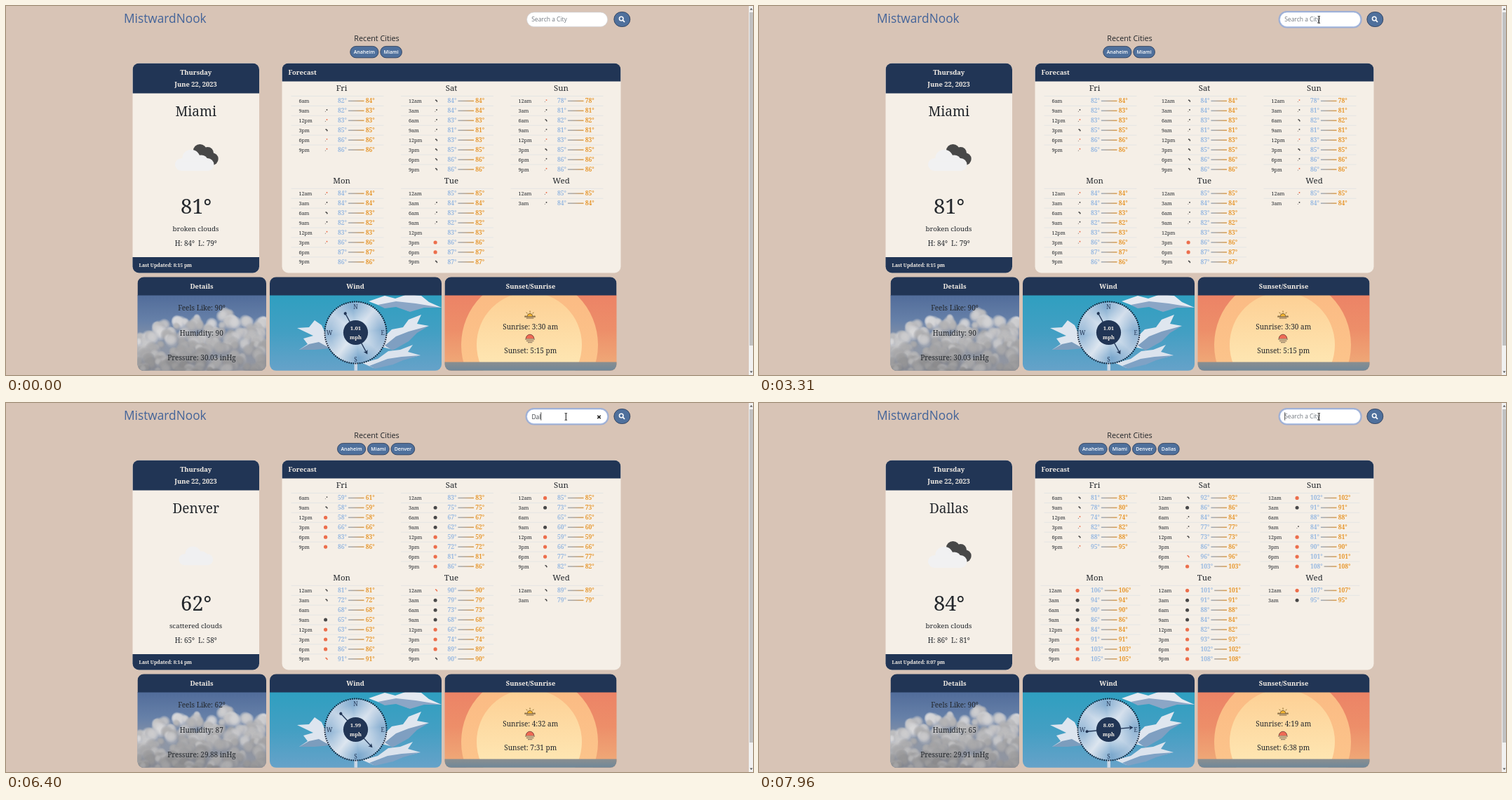
Animation, 1065 px wide and 526 px high, one loop 8000 ms. Source, as an HTML page with a canvas:

```html
<!DOCTYPE html>
<html lang="en">
<head>
<meta charset="utf-8">
<title>Weather dashboard</title>
<style>
  html, body { margin: 0; width: 100%; height: 100%; overflow: hidden; background: #d8c4b6; }
  canvas { display: block; }
</style>
</head>
<body>
<canvas id="stage" width="1065" height="526"></canvas>
<script>
const LOOP = 8000;
const NAVY = '#213555', BLUE = '#4f709c', SAND = '#d8c4b6', CREAM = '#f5efe7', INK = '#23272c';
const HOURS = ['12am', '3am', '6am', '9am', '12pm', '3pm', '6pm', '9pm'];
const DAYS = ['Fri', 'Sat', 'Sun', 'Mon', 'Tue', 'Wed'];

// Each day: temperatures (low-high when they differ), then one icon letter per row.
const CITIES = [
  { name: 'Miami', sky: 'broken clouds', now: 81, high: 84, low: 79, updated: '8:15', feels: 90, humidity: 90,
    pressure: '30.03', wind: '1.01', rise: '3:30', set: '5:15', days: [
    '82-84 82-83 83 85 86 86|-rodoo', '84 84 83 81 83 85 86 86|drrrdddd', '78 81 82 81 83 85 86 86|ordrodro',
    '84 84 83 82 83 86 87 86|ordroo--', '85 84 83 82 83 86 87 87|-rrr-ssd', '85 84|or'] },
  { name: 'Denver', sky: 'scattered clouds', now: 62, high: 65, low: 58, updated: '8:14', feels: 62, humidity: 87,
    pressure: '29.88', wind: '1.99', rise: '4:32', set: '7:31', days: [
    '59-61 58-59 58 66 83 86|rdssss', '83 75 67 62 59 72 81 86|-mmmssss', '85 73 65 60 59 66 77 82|sm-msssd',
    '81 72 68 65 63 72 86 91|dd-msssq', '90 79 73 68 66 74 89 90|qmmmsssd', '89 79|dd'] },
  { name: 'Dallas', sky: 'broken clouds', now: 84, high: 86, low: 81, updated: '8:07', feels: 90, humidity: 65,
    pressure: '29.91', wind: '8.05', rise: '4:19', set: '6:38', days: [
    '81-83 78-80 74 82 88 95|ddoodo', '92 86 84 77 73 86 96 103|dmrrd-qs', '102 91 88 84 81 90 101 108|sm-rssss',
    '106 94 90 86 84 91 103 105|smmmssss', '101 91 88 84 82 93 102 108|smmmssss', '107 95|sm'] }
];

const stage = document.getElementById('stage').getContext('2d');
let ctx = stage;

const serif = (size, weight = 400) => `${weight} ${size}px "Noto Serif", serif`;
const sans = (size, weight = 400) => `${weight} ${size}px "Open Sans", "Noto Sans", sans-serif`;

function text(str, x, y, font, color = INK, align = 'center') {
  ctx.font = font;
  ctx.fillStyle = color;
  ctx.textAlign = align;
  ctx.fillText(str, x, y);
  return ctx.measureText(str).width;
}
function box(x, y, w, h, r, fill, stroke, width = 1) {
  ctx.beginPath();
  ctx.roundRect(x, y, w, h, r);
  if (fill) { ctx.fillStyle = fill; ctx.fill(); }
  if (stroke) { ctx.strokeStyle = stroke; ctx.lineWidth = width; ctx.stroke(); }
}
function disc(x, y, r, fill) {
  ctx.beginPath();
  ctx.arc(x, y, r, 0, 7);
  ctx.fillStyle = fill;
  ctx.fill();
}
function path(points, stroke, width = 1) {
  ctx.beginPath();
  for (let i = 0; i < points.length; i += 2) ctx.lineTo(points[i], points[i + 1]);
  if (stroke) { ctx.strokeStyle = stroke; ctx.lineWidth = width; ctx.stroke(); }
}
function polygon(points, fill) {
  path(points);
  ctx.fillStyle = fill;
  ctx.fill();
}
function addStops(g, colors) {
  colors.forEach((c, i) => g.addColorStop(i / (colors.length - 1), c));
  return g;
}
const gradient = (x0, y0, x1, y1, ...colors) => addStops(ctx.createLinearGradient(x0, y0, x1, y1), colors);

function glow(x, y, r, ...colors) {
  disc(x, y, r, addStops(ctx.createRadialGradient(x, y, 0, x, y, r), colors));
}
function seeded(seed) {
  return () => (seed = (seed * 16807) % 2147483647) / 2147483647;
}

// CSS "ease": cubic-bezier(.25, .1, .25, 1)
function ease(x) {
  if (x <= 0) return 0;
  if (x >= 1) return 1;
  const curve = (a, b, s) => 3 * a * s * (1 - s) ** 2 + 3 * b * s * s * (1 - s) + s ** 3;
  let lo = 0, hi = 1;
  for (let i = 0; i < 20; i++) {
    const mid = (lo + hi) / 2;
    if (curve(.25, .25, mid) < x) lo = mid; else hi = mid;
  }
  return curve(.1, 1, lo);
}

function panel(x, y, w, h, head, paint) {
  ctx.save();
  box(x, y, w, h, 9);
  ctx.clip();
  paint();
  ctx.fillStyle = NAVY;
  ctx.fillRect(x, y, w, head);
  ctx.restore();
}

function cloudySky() {
  ctx.fillStyle = gradient(0, 412, 0, 520, '#516c9a', '#6680a8', '#8d97a8', '#92949c');
  ctx.fillRect(187, 412, 185, 109);
  const rnd = seeded(77), count = 230;
  // Puffs are laid from the ridge of the cloud bank down to its shaded foot.
  for (let i = 0; i < count; i++) {
    const depth = i / count, x = 188 + rnd() * 184;
    const ridge = 452 - 15 * Math.sin((x - 193) / 58) ** 2 - (x > 300 ? 9 : 0) + Math.max(0, 208 - x);
    const y = ridge + depth * (524 - ridge) + rnd() * 5, r = 6 + rnd() * 6;
    const v = Math.round(212 - 58 * depth + (rnd() - .5) * 40);
    const lit = `${v},${v - 1},${v - 1}`, shade = `${v - 28},${v - 25},${v - 16}`;
    glow(x, y + 2.5, r, `rgba(${shade},.75)`, `rgba(${shade},.65)`, `rgba(${shade},0)`);
    glow(x - 1, y, r * .85, `rgba(${lit},.85)`, `rgba(${lit},.7)`, `rgba(${lit},0)`);
  }
}

function windySky() {
  ctx.fillStyle = gradient(0, 412, 0, 520, '#2f9fc0', '#439fc3', '#66a2c9');
  ctx.fillRect(376, 412, 246, 109);
  polygon([517, 421, 540, 413, 555, 417, 572, 411, 592, 413, 603, 422, 621, 430, 596, 429, 574, 435, 556, 427, 538, 429], '#e4e9f1');
  polygon([530, 426, 556, 421, 584, 424, 621, 430, 596, 430, 576, 436, 556, 429, 540, 431], '#8ba6c6');
  polygon([536, 486, 541, 470, 550, 461, 566, 458, 574, 447, 592, 440, 586, 453, 603, 456, 585, 464, 574, 476, 552, 490], '#dfe6ef');
  polygon([540, 484, 556, 471, 574, 464, 603, 456, 586, 466, 574, 478, 551, 491], '#7f9fc1');
  polygon([508, 509, 530, 503, 545, 492, 562, 490, 580, 483, 573, 493, 591, 498, 566, 504, 552, 510, 524, 516], '#dbe3ed');
  polygon([518, 513, 544, 503, 564, 500, 591, 498, 566, 505, 552, 511, 526, 517], '#7fa2c5');
  polygon([415, 459, 432, 458, 440, 448, 450, 455, 457, 470, 462, 488, 436, 487, 418, 490, 430, 482, 424, 474, 438, 470], '#dde5ef');
  polygon([418, 490, 432, 482, 446, 479, 462, 488, 440, 490], '#7c9dbd');
}

function compass() {
  const cx = 498.5, cy = 465.5;
  box(496.5, 509, 4.5, 12, 0, '#c9d7e6');
  const metal = ctx.createConicGradient(-.9, cx, cy);
  disc(cx, cy, 43.5, addStops(metal, ['#d3deeb', '#8cb1d2', '#b4cbe1', '#7ba8cd', '#dbe4ee', '#94b7d6', '#c3d4e6', '#84add0', '#d3deeb']));
  glow(cx, cy, 36, 'rgba(240,245,250,.75)', 'rgba(226,235,244,.55)', 'rgba(220,231,242,0)');
  ctx.setLineDash([1.7, 1.4]);
  ctx.beginPath();
  ctx.arc(cx, cy, 44, 0, 7);
  ctx.strokeStyle = '#101d33';
  ctx.lineWidth = 2;
  ctx.stroke();
  ctx.setLineDash([]);
  [['N', 0, -34], ['S', 0, 41], ['W', -37.5, 3.5], ['E', 38.5, 3.5]]
    .forEach(([s, dx, dy]) => text(s, cx + dx, cy + dy, serif(8.3), NAVY));
}

function sunScene() {
  ctx.fillStyle = gradient(0, 412, 0, 510, '#ec8366', '#ed8e69', '#efa877');
  ctx.fillRect(625, 412, 246, 109);
  disc(746.5, 483, 97.5, gradient(0, 412, 0, 510, '#fbbb84', '#fcc48b'));
  disc(746, 483, 75, gradient(0, 412, 0, 510, '#fdd095', '#fee6b2'));
  ctx.fillStyle = gradient(0, 507, 0, 520, '#8b8f90', '#6f8799');
  ctx.fillRect(625, 507.5, 246, 13);
}

function sunIcons() {
  ctx.lineCap = 'round';
  ctx.beginPath();
  ctx.arc(747, 442.5, 4, Math.PI, 0);
  ctx.fillStyle = '#f4b52f';
  ctx.fill();
  ctx.strokeStyle = '#57452f';
  ctx.lineWidth = .8;
  ctx.stroke();
  for (let i = 0; i < 5; i++) {
    const a = Math.PI * (1 + i / 4), c = Math.cos(a), s = Math.sin(a);
    path([747 + c * 5.4, 442 + s * 5.4, 747 + c * 7.2, 442 + s * 7.2], '#806022', .9);
  }
  path([739.5, 443, 754.5, 443], '#57452f', 1);
  path([742, 445, 752, 445], '#57452f', .8);

  ctx.beginPath();
  ctx.arc(747, 474, 5.8, Math.PI, 0);
  ctx.fillStyle = '#ee6a55';
  ctx.fill();
  ctx.strokeStyle = '#6d3934';
  ctx.lineWidth = .8;
  ctx.stroke();
  path([740.5, 475, 753.5, 475], '#54453e', .9);
  path([742, 477.4, 752, 477.4], '#54453e', .8);
  path([744, 479.7, 750, 479.7], '#54453e', .8);
  ctx.lineCap = 'butt';
}

function scrollbar() {
  ctx.fillStyle = '#f1f1f1';
  ctx.fillRect(1059, 0, 6, 526);
  ctx.fillStyle = '#c1c1c1';
  ctx.fillRect(1060, 9, 5, 475);
  polygon([1060.5, 5.5, 1064.5, 5.5, 1062.5, 3], '#505050');
  polygon([1060.5, 520.5, 1064.5, 520.5, 1062.5, 523], '#505050');
}

function buildBackdrop() {
  const layer = document.createElement('canvas');
  layer.width = 1065;
  layer.height = 526;
  ctx = layer.getContext('2d');
  ctx.fillStyle = SAND;
  ctx.fillRect(0, 0, 1065, 526);
  const head = serif(9.4, 700);
  text('MistwardNook', 168, 24, sans(17.3, 500), '#446499', 'left');
  text('Recent Cities', 528.5, 50, sans(10.8, 500), '#212529');

  panel(180.5, 81.5, 180.5, 299, 43, () => {
    ctx.fillStyle = CREAM;
    ctx.fillRect(180, 81, 182, 300);
    ctx.fillStyle = NAVY;
    ctx.fillRect(180, 358, 182, 23);
  });
  text('Thursday', 270.7, 98, head, CREAM);
  text('June 22, 2023', 270.5, 115, head, CREAM);

  panel(393.5, 81.5, 483, 299, 26, () => {
    ctx.fillStyle = CREAM;
    ctx.fillRect(393, 81, 485, 300);
  });
  text('Forecast', 402.5, 98, head, CREAM, 'left');

  panel(187.5, 386.3, 183.5, 133.5, 26.2, cloudySky);
  panel(376, 386.3, 245, 133.5, 26.2, () => { windySky(); compass(); });
  panel(625.5, 386.3, 245, 133.5, 26.2, sunScene);
  text('Details', 279, 402.5, head, CREAM);
  text('Wind', 498, 402.5, head, CREAM);
  text('Sunset/Sunrise', 748, 402.5, head, CREAM);
  sunIcons();

  box(866.8, 8.5, 23, 21, 10.5, BLUE, NAVY, .8);
  ctx.beginPath();
  ctx.arc(877.2, 18.1, 2.8, 0, 7);
  ctx.strokeStyle = '#fff';
  ctx.lineWidth = 1.5;
  ctx.stroke();
  path([879.2, 20.1, 882, 22.9], '#fff', 1.7);
  scrollbar();
  ctx = stage;
  return layer;
}

function cloud(x, y, scale, color) {
  ctx.save();
  ctx.translate(x, y);
  ctx.scale(scale, scale);
  disc(-19, 6.5, 9, color);
  disc(-5, -2, 12.8, color);
  disc(9, 4, 11, color);
  disc(18.5, 6.5, 9, color);
  box(-19, 2, 37.5, 13.5, 0, color);
  ctx.restore();
}

function cityCard(c) {
  text(c.name, 270.7, 157, serif(19));
  if (c.name === 'Denver') {
    cloud(271, 217.5, .88, '#f0f0f1');
  } else {
    disc(276.5, 206.7, 9.7, '#484848');
    disc(287.5, 209.5, 8.5, '#484848');
    disc(294, 218, 8.7, '#484848');
    box(276, 210, 17, 15, 0, '#484848');
    cloud(269, 219.5, 1, '#f1f1f2');
  }
  text(c.now + '°', 271, 296, serif(29));
  text(c.sky, 270.5, 320.5, serif(9.75));
  text(`H: ${c.high}°\u00a0 L: ${c.low}°`, 270.7, 342, serif(9.9));
  text(`Last Updated: ${c.updated} pm`, 189.5, 372.3, serif(6.8, 700), CREAM, 'left');

  const body = serif(10);
  text(`Feels Like: ${c.feels}°`, 279, 434, body);
  text(`Humidity: ${c.humidity}`, 278.7, 469.7, body);
  text(`Pressure: ${c.pressure} inHg`, 279, 505.3, body);
  text(`Sunrise: ${c.rise} am`, 747.7, 461.3, body);
  text(`Sunset: ${c.set} pm`, 747.7, 494.7, body);
}

function recents(count) {
  const pills = [['Anaheim', 41], ['Miami', 31.5], ['Denver', 34.5], ['Dallas', 31]].slice(0, count);
  let x = 527.6 - pills.reduce((sum, p) => sum + p[1] + 2, -2) / 2;
  for (const [name, w] of pills) {
    box(x + .4, 57.4, w - .8, 16.4, 8.2, BLUE, NAVY, .8);
    text(name, x + w / 2, 68.3, sans(7, 600), '#fff');
    x += w + 2;
  }
}

function rowIcon(kind, x, y) {
  if (kind === 's') disc(x - .6, y, 2.6, '#ec6e4c');
  if (kind === 'm') disc(x - .6, y, 2.5, '#484848');
  if (kind === 'd' || kind === 'q') {
    path([x - .7, y - 1.6, x + 1.2, y - .6, x + 2, y + 1.2], kind === 'd' ? '#484848' : '#ec6e4c', 1.5);
  }
  if (kind === 'r' || kind === 'o') {
    disc(x + 1.3, y - 1.3, .95, kind === 'r' ? '#484848' : '#ec6e4c');
    disc(x - .8, y + 1.1, .6, '#8c8480');
  }
}

function dayTable(day, index, loading) {
  const c = 478.5 + 156.5 * (index % 3), y0 = index < 3 ? 135.4 : 267.3;
  const [temps, icons] = day.split('|');
  const rows = temps.split(' ').map(s => s.split('-'));
  const wide = rows.some(r => +r[0] > 99);
  const half = loading ? 3 : 0;
  const tempFont = serif(8.5, 600);
  const bar = gradient(c + 10, 0, c + 32, 0, '#a3aebb', '#b9a58f', '#dd9f4c');
  text(DAYS[index], c, y0 - 14.8, serif(11.4));
  let y = y0;
  rows.forEach(([low, high = low], i) => {
    const hour = HOURS[i + (index ? 0 : 2)];
    const wrapped = loading && hour === '12pm';
    path([c - (wide ? 77 : 72) + half, y - 7, c + (wide ? 65 : 60) - half, y - 7], '#dde1e2', .7);
    if (wrapped) y += 5;
    const left = c - (wide ? 65.5 : 61) + half / 2;
    if (wrapped) {
      text('12p', left, y - 3.5, serif(7.2), INK, 'left');
      text('m', left, y + 8.5, serif(7.2), INK, 'left');
    } else {
      text(hour, left, y + 2.6, serif(7.2), INK, 'left');
    }
    const kind = icons[i];
    if (!(loading && kind === 'o')) rowIcon(kind, c - (wide ? 23.8 : 22.3) + half / 4, y);
    const w = text(low + '°', c - 5.5, y + 3, tempFont, '#98b9e1', 'left');
    path([c - 3.5 + w, y, c + 32, y], bar, 1.6);
    text(high + '°', c + 34.3, y + 3, tempFont, '#e7982f', 'left');
    y += 13.94 + (wrapped ? 5 : 0);
  });
}

function needle(t) {
  const turn = t < 3640 ? 61.5
    : t < 7200 ? 61.5 - 14.5 * ease((t - 3640) / 1000)
    : 47 - 53 * ease((t - 7130) / 1000);
  ctx.save();
  ctx.translate(498.5, 465.5);
  ctx.rotate(turn * Math.PI / 180);
  path([-31, 0, 33, 0], NAVY, 1.4);
  disc(-31, 0, 2.1, NAVY);
  polygon([35.2, 0, 29.5, -3.2, 31, 0, 29.5, 3.2], NAVY);
  ctx.restore();
  disc(498.5, 465.5, 17.6, NAVY);
}

const KEYS = [[2030, 'D'], [2290, 'De'], [2390, 'Den'], [2490, 'Denv'], [2630, 'Denve'], [2760, 'Denver'], [3310, ''],
  [5940, 'D'], [6210, 'Da'], [6400, 'Dal'], [6530, 'Dall'], [6670, 'Dalla'], [6800, 'Dallas'], [7060, '']];

function searchBox(t) {
  const focus = ease((t - 1180) / 190);
  if (focus) {
    ctx.globalAlpha = focus;
    box(740.6, 7, 119, 24.4, 12, '#9fafd3');
    ctx.globalAlpha = 1;
  }
  box(742.6, 9, 115, 20.4, 10, '#fff', focus ? '#a0bbe8' : '#ced4da', .6);

  const pressed = KEYS.filter(k => k[0] <= t);
  const typed = pressed.length ? pressed[pressed.length - 1][1] : '';
  let w = 0;
  if (typed) {
    w = text(typed, 749.4, 22.5, sans(8.5), '#3a3f45', 'left');
    path([843.3, 17.7, 847.7, 22.1], '#222', 1.5);
    path([847.7, 17.7, 843.3, 22.1], '#222', 1.5);
  } else {
    text('Search a City', 749.2, 22.3, sans(8.5), '#737a81', 'left');
  }
  // The caret blink restarts with every typed letter.
  const reset = pressed.filter(k => k[1]).reduce((last, k) => k[0], 1170);
  if (t >= 1180 && Math.floor((t - reset) / 535) % 2 === 0) {
    path([749.7 + w, 13.3, 749.7 + w, 24.7], '#222', .8);
  }
}

const TRACK = [[100, 1024, 491], [300, 925, 247], [430, 898, 133], [530, 848, 87], [600, 815, 60],
  [710, 800, 7], [840, 796.5, 28], [969, 796.5, 28], [970, 797, 23], [1029, 797, 23], [1030, 798.3, 19.5]];

function pointer(time) {
  if (time < 100) return;
  const t = time < 840 ? 100 + Math.floor((time - 100) / 67) * 67 : time;
  const next = TRACK.findIndex(p => p[0] > t);
  let [, x, y] = TRACK[TRACK.length - 1];
  if (next > 0) {
    const a = TRACK[next - 1], b = TRACK[next], k = (t - a[0]) / (b[0] - a[0]);
    x = a[1] + (b[1] - a[1]) * k;
    y = a[2] + (b[2] - a[2]) * k;
  }
  if (x > 742 && x < 858 && y > 9 && y < 30) {
    path([x, y - 4.6, x, y + 4.6], '#111', 1);
    path([x - 1.8, y - 4.8, x + 1.8, y - 4.8], '#111', .8);
    path([x - 1.8, y + 4.8, x + 1.8, y + 4.8], '#111', .8);
  } else {
    const p = [0, 0, 0, 9, 2.1, 7.1, 3.6, 10.5, 4.9, 9.9, 3.5, 6.7, 6.3, 6.5, 0, 0].map((v, i) => v + (i % 2 ? y : x));
    polygon(p, '#fff');
    path(p, '#111', .6);
  }
}

const backdrop = buildBackdrop();

function draw(t) {
  ctx.drawImage(backdrop, 0, 0);
  const step = t < 3640 ? 0 : t < 7200 ? 1 : 2;
  const table = t < 3710 ? 0 : t < 7270 ? 1 : 2;
  const city = CITIES[step];
  recents(step + 2);
  cityCard(city);
  CITIES[table].days.forEach((day, i) => dayTable(day, i, table === 2 && i === 0 && t < 7340));
  needle(t);
  text(city.wind, 498.5, 461.8, serif(7.8, 700), CREAM);
  text('mph', 498.5, 475, serif(7.4, 700), CREAM);
  searchBox(t);
  pointer(t);
}

let start;
function frame(now) {
  start ??= now;
  draw((now - start) % LOOP);
  requestAnimationFrame(frame);
}
requestAnimationFrame(frame);
</script>
</body>
</html>
```
